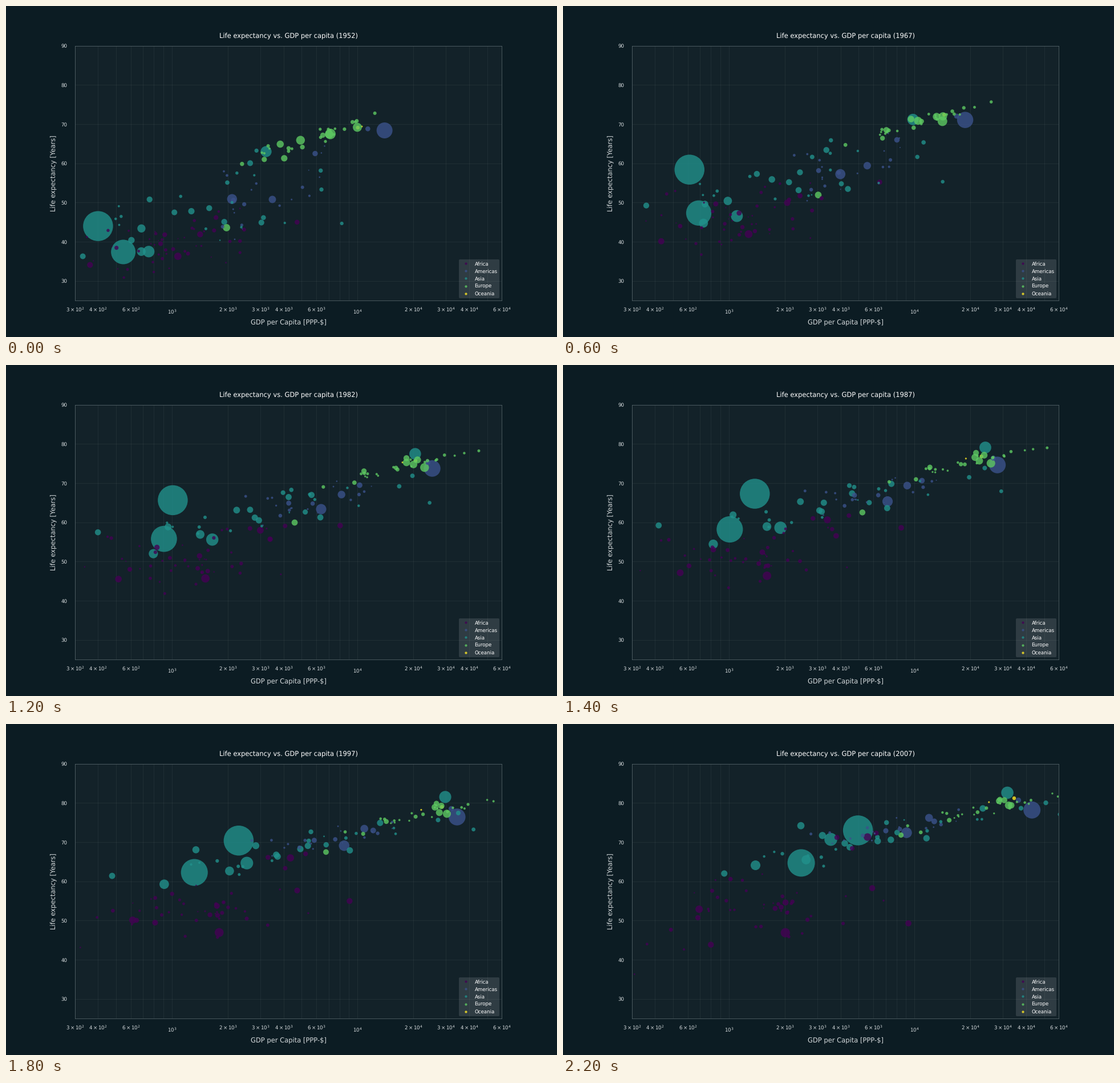
A matplotlib script that plays this animation: 966 px wide and 580 px high, repeating every 2400 ms.

```python
import matplotlib.pyplot as plt
import numpy as np
from matplotlib.animation import FuncAnimation
from matplotlib.lines import Line2D
from matplotlib.ticker import LogFormatterSciNotation

W, H, DPI = 966, 580, 72
STEPS = 12
BIGGEST = 52.5  # diameter of the most populous country, in points
TEXT, SMALL = 11.5, 8.625
U = np.linspace(0, 1, STEPS)

NAMES = ["Africa", "Americas", "Asia", "Europe", "Oceania"]
COLORS = dict(zip(NAMES, plt.cm.viridis(np.linspace(0, 1, 5))))

# Largest countries: population share, GDP and life expectancy at the start,
# the same two at the end, then optional easing for GDP and life.
# All shares are relative to the country that moves along CHINA.
LARGE = {
    "Oceania": [(.0156, 10040, 69.1, 34435, 81.2),
                (.0036, 10557, 69.4, 25185, 80.2)],
    "Asia": [(.67, 547, 37.4, 2452, 64.7, .52, 1.42),
             (.148, 750, 37.5, 3541, 70.7, .9, 1.0),
             (.135, 3217, 63, 31656, 82.6, 2.1, 1.7),
             (.084, 684, 37.5, 1391, 64.1, .3, 1.0),
             (.074, 685, 43.4, 2606, 65.5, 1.0, 1.2),
             (.047, 605, 40.4, 2442, 74.2, .5, 1.0),
             (.045, 1273, 47.8, 3190, 71.7, 1.2, 1.3),
             (.038, 758, 50.8, 7458, 70.6),
             (.036, 331, 36.3, 944, 62, .25, 2.2),
             (.037, 1031, 47.5, 23348, 78.6),
             (.037, 3035, 44.9, 11606, 71)],
    "Europe": [(.124, 7144, 67.5, 32170, 79.4, 1.9, 1.0),
               (.091, 9980, 69.2, 33203, 79.4, 1.1, 1.0),
               (.086, 4931, 65.9, 28570, 80.5),
               (.077, 7030, 67.4, 30470, 80.7),
               (.057, 3834, 64.9, 28821, 80.9, 1.9, 1.6),
               (.06, 1969, 43.6, 8458, 71.8, 1.1, 1.1),
               (.046, 4029, 61.3, 15390, 75.6, 1.7, 2.2),
               (.031, 3145, 61, 10808, 72.5, 3.0, 2.0)],
    "Americas": [(.283, 13990, 68.4, 42952, 78.2, .95, 1.0),
                 (.11, 2109, 50.9, 9066, 72.4, 1.8, 1.1),
                 (.06, 3478, 50.8, 11978, 76.2),
                 (.032, 5911, 62.5, 12779, 75.3, 1.6, 1.0),
                 (.027, 11367, 68.8, 36319, 80.7, 1.3, 1.0),
                 (.026, 2144, 50.6, 7007, 72.9, 1.1, 1.3)],
    "Africa": [(.06, 1077, 36.3, 2014, 46.9),
               (.04, 1419, 41.9, 5581, 71.3),
               (.038, 362, 34.1, 691, 52.9),
               (.026, 4725, 45, 9270, 49.3, 2.0, 1.0),
               (.018, 1688, 42.9, 3820, 71.2),
               (.017, 2449, 43.1, 6223, 72.3)],
}
CHINA = {"step": (0, 1, 2, 3, 5, 7, 9, 11),
         "gdp": (400, 576, 488, 613, 741, 1379, 2289, 4959),
         "life": (44, 50.5, 44.5, 58.4, 64, 67.3, 70.4, 73)}

# Regional trend: growth of the population share and the default easing.
TREND = {"Oceania": (1, 1.1, 1), "Asia": (1.25, 1, 1.25),
         "Europe": (.52, 1.75, 1.3), "Americas": (1.15, 1.5, 1.3),
         "Africa": (1.6, 1, 1)}

# Smaller countries: how many, their typical share and its spread, then
# (GDP or GDP gain, spread, life, life per log GDP, noise) at start and end.
CROWD = {"Africa": (45, .0055, .8, (900, .5, 39, 3, 3.5),
                    (1.6, .5, 53.5, 5, 5)),
         "Americas": (19, .0055, .8, (3200, .42, 53, 7, 6),
                      (2.5, .4, 73.5, 2.5, 1.5)),
         "Asia": (21, .0085, .8, (1800, .8, 50, 4, 6),
                  (4.2, .7, 71.5, 4.5, 2)),
         "Europe": (22, .011, .6, (5500, .55, 66, 7.5, 1.2),
                    (4.2, .3, 78, 4, .8))}


def ease(power):
    return 1 - (1 - U) ** power


def track(region, share, gdp0, life0, gdp1, life1, bend=None, life_bend=None):
    growth, base, life_base = TREND[region]
    gdp = gdp0 * (gdp1 / gdp0) ** ease(bend or base)
    life = life0 + (life1 - life0) * ease(life_bend or life_base)
    if region == "Africa":
        # A small total gain means a rise that is later lost again.
        life += (60 / max(life1 - life0, 4) - 2) * np.sin(np.pi * U)
    return gdp, life, share * growth ** U


def crowd(region, rng):
    count, share, spread, start, end = CROWD[region]
    gdp0, vary0, mean0, slope0, noise0 = start
    gain, vary1, mean1, slope1, noise1 = end
    for _ in range(count):
        z = np.clip(rng.normal(size=5), -1.9, 1.9)
        rich = vary0 * z[0]
        richer = rich + vary1 * z[1]
        yield (share * np.exp(spread * z[2]),
               gdp0 * np.exp(rich), mean0 + slope0 * rich + noise0 * z[3],
               gdp0 * gain * np.exp(richer),
               mean1 + slope1 * richer + noise1 * z[4])


def build():
    """Return region names and an array of (country, quantity, step)."""
    rng = np.random.default_rng(8)
    steps = np.arange(STEPS)
    china = (np.exp(np.interp(steps, CHINA["step"], np.log(CHINA["gdp"]))),
             np.interp(steps, CHINA["step"], CHINA["life"]), np.ones(STEPS))
    items = [("Asia", china)]
    for region in CROWD:
        for row in LARGE[region] + list(crowd(region, rng)):
            items.append((region, track(region, *row)))
    items.sort(key=lambda item: -item[1][2][0])
    items = [("Oceania", track("Oceania", *row))
             for row in LARGE["Oceania"]] + items
    regions, tracks = zip(*items)
    return regions, np.array(tracks)


regions, tracks = build()

plt.rcParams.update({"font.family": "DejaVu Sans",
                     "text.hinting": "no_hinting"})
fig = plt.figure(figsize=(W / DPI, H / DPI), dpi=DPI, facecolor="#0c1c23")
ax = fig.add_axes([.125, .11, .775, .77], facecolor="#132229")
ax.set_xscale("log")
ax.set(xlim=(300, 60000), ylim=(25, 90))
ax.set_axisbelow(True)
ax.grid(True, which="both", color="white", alpha=.065, lw=.8)
for spine in ax.spines.values():
    spine.set(color="#56656a", linewidth=.8)

ax.xaxis.set_minor_formatter(LogFormatterSciNotation(minor_thresholds=(4, .4)))
ax.tick_params(which="both", length=0, labelsize=SMALL, labelcolor="#d5dadc")
ax.tick_params(axis="y", pad=13.4)
ax.tick_params(axis="x", which="major", pad=13.2)
ax.tick_params(axis="x", which="minor", pad=9.6)

ax.set_xlabel("GDP per Capita [PPP-$]", size=TEXT, color="#d5dadc")
ax.set_ylabel("Life expectancy [Years]", size=TEXT, color="#d5dadc")
ax.xaxis.set_label_coords(.5, -.0715)
ax.yaxis.set_label_coords(-.043, .5)
title = ax.set_title("", size=TEXT, color="white", pad=14.4)

dots = ax.scatter(tracks[:, 0, 0], tracks[:, 1, 0], linewidths=0, alpha=.8,
                  c=[COLORS[name] for name in regions], zorder=2)
handles = [Line2D([], [], ls="", marker="o", ms=4.2, mew=0, alpha=.8,
                  color=COLORS[name], label=name) for name in NAMES]
ax.legend(handles=handles, loc="lower right", fontsize=SMALL,
          labelcolor="white", facecolor="white", edgecolor="none",
          framealpha=.12)


def draw(step):
    gdp, life, share = tracks[:, :, step].T
    dots.set_offsets(np.column_stack([gdp, life]))
    dots.set_sizes(BIGGEST ** 2 * share)
    title.set_text(f"Life expectancy vs. GDP per capita ({1952 + 5 * step})")
    return dots, title


anim = FuncAnimation(fig, draw, frames=STEPS, interval=200, repeat=True,
                     repeat_delay=0, blit=False)
plt.show()
```
